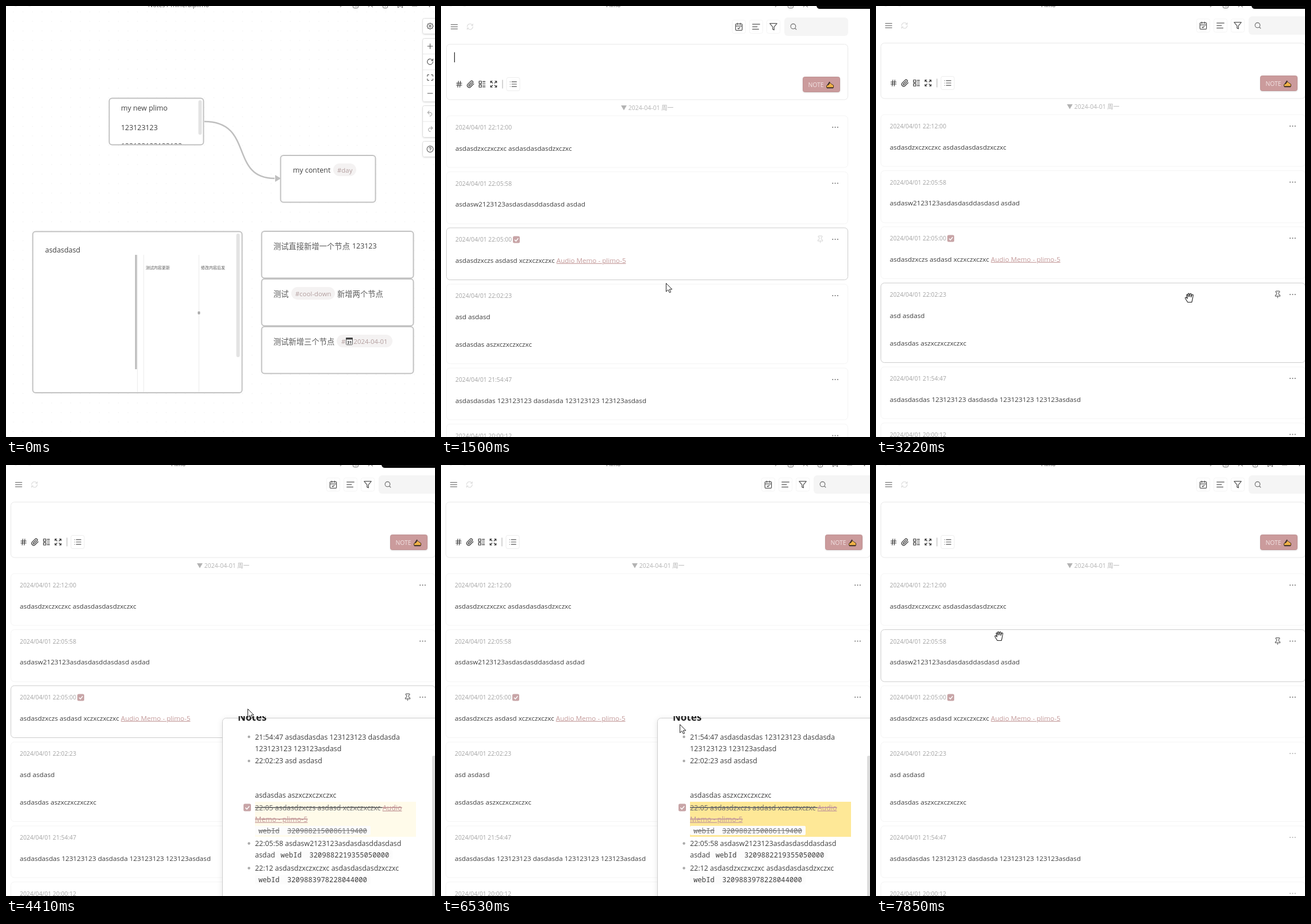
An HTML page for the animation above (7.99 s loop, 746x750 px).

```html
<!DOCTYPE html>
<html lang="zh">
<head>
<meta charset="utf-8">
<title>Notes</title>
<style>
html, body { margin: 0; width: 100%; height: 100%; overflow: hidden; background: #fff; }
svg { display: block; width: 746px; height: 750px; }
text { font-family: "Open Sans", "Noto Sans CJK SC", "Noto Sans CJK", sans-serif; white-space: pre; }
.mono { font-family: "Noto Sans Mono", "DejaVu Sans Mono", monospace; font-size: 12.2px; }
.cjk { font-weight: 300; }
.link { fill: #c49a9a; text-decoration: underline; }
.done { text-decoration: line-through; }
.done .link, .link.done { text-decoration: underline line-through; }
.icon { fill: none; stroke-linecap: round; stroke-linejoin: round; }
.node { fill: #fff; stroke: #c2c2c2; stroke-width: 2; }
</style>
</head>
<body>
<svg id="stage" viewBox="0 0 746 750" xmlns="http://www.w3.org/2000/svg"></svg>
<script>
const LOOP = 7990;
const INK = '#3f3f3f', ROSE = '#c8a5a7';

const text = (x, y, s, size = 12.4, fill = INK, more = '') =>
  `<text x="${x}" y="${y}" font-size="${size}" fill="${fill}" ${more}>${s}</text>`;
const rect = (x, y, w, h, r, fill, more = '') =>
  `<rect x="${x}" y="${y}" width="${w}" height="${h}" rx="${r}" fill="${fill}" ${more}/>`;
const path = (d, stroke, w = 1, more = '') =>
  `<path d="${d}" fill="none" stroke="${stroke}" stroke-width="${w}" ${more}/>`;
const icon = (name, x, y, size = 15, color = '#555', w = 2) =>
  `<path class="icon" d="${ICONS[name]}" stroke="${color}" stroke-width="${w}" ` +
  `transform="translate(${x - size / 2} ${y - size / 2}) scale(${size / 24})"/>`;
const group = (id, body, more = '') => `<g id="${id}" ${more}>${body}</g>`;
const check = (x, y, s) => rect(x, y, s, s, 2.5, ROSE) +
  path(`M${x + s * .25} ${y + s * .52}l${s * .2} ${s * .2} ${s * .33}-${s * .4}`, '#fff', 1.5);

const ICONS = {
  menu: 'M3 6h18M3 12h18M3 18h18',
  refresh: 'M3 12a9 9 0 0 1 15-6.7L21 8M21 3v5h-5M21 12a9 9 0 0 1-15 6.7L3 16M3 21v-5h5',
  reload: 'M21 12a9 9 0 1 1-2.600-6.400L21 8M21 3v5h-5',
  date: 'M3 6a2 2 0 0 1 2-2h14a2 2 0 0 1 2 2v14a2 2 0 0 1-2 2H5a2 2 0 0 1-2-2ZM3 10h18M8 2v4M16 2v4M9 16l2 2 4-4',
  align: 'M2 5h20M2 12h13M2 19h17',
  filter: 'M22 3H2l8 9.500V19l4 2v-8.500Z',
  search: 'M19 11a8 8 0 1 1-16 0 8 8 0 0 1 16 0M21 21l-4.300-4.300',
  hash: 'M4 9h16M4 15h16M10 3 8 21M16 3l-2 18',
  clip: 'M21.400 11l-9.200 9.200a6 6 0 0 1-8.500-8.500l8.600-8.600a4 4 0 1 1 5.700 5.700l-8.600 8.600a2 2 0 0 1-2.800-2.800l8.500-8.500',
  blocks: 'M3 3h7v7H3ZM3 14h7v7H3ZM14 4h7M14 9h7M14 15h7M14 20h7',
  expand: 'M15 15l6 6M15 9l6-6M21 16v5h-5M21 8V3h-5M3 16v5h5M3 21l6-6M3 8V3h5M9 9 3 3',
  list: 'M8 5h14M8 12h14M8 19h14M3 5h.01M3 12h.01M3 19h.01',
  pin: 'M12 17v5M5 17h14v-1.800a2 2 0 0 0-1.100-1.800l-1.800-.9A2 2 0 0 1 15 10.800V6h1a2 2 0 0 0 0-4H8a2 2 0 0 0 0 4h1v4.800a2 2 0 0 1-1.100 1.700l-1.800.9A2 2 0 0 0 5 15.200Z',
  more: 'M4 12h.01M12 12h.01M20 12h.01',
  gear: 'M12 2l3 3 4-.5 .5 4 2.500 3.500-2.500 3.500-.5 4-4-.5-3 3-3-3-4 .5-.5-4L2 12l2.500-3.500 .5-4 4 .5ZM15 12a3 3 0 1 1-6 0 3 3 0 0 1 6 0',
  plus: 'M4 12h16M12 4v16',
  minus: 'M4 12h16',
  fit: 'M8 3H5a2 2 0 0 0-2 2v3M21 8V5a2 2 0 0 0-2-2h-3M3 16v3a2 2 0 0 0 2 2h3M16 21h3a2 2 0 0 0 2-2v-3',
  undo: 'M9 14 4 9l5-5M4 9h10a6 6 0 0 1 0 11h-3',
  redo: 'M15 14l5-5-5-5M20 9H10a6 6 0 0 0 0 11h3',
  help: 'M22 12a10 10 0 1 1-20 0 10 10 0 0 1 20 0M9 9a3 3 0 0 1 6 1c0 2-3 2-3 4M12 17.500h.01',
  prev: 'M15 18l-6-6 6-6',
  next: 'M9 18l6-6-6-6',
  target: 'M22 12a10 10 0 1 1-20 0 10 10 0 0 1 20 0M22 12h-4M6 12H2M12 6V2M12 22v-4',
  tiles: 'M3 3h7v7H3ZM14 3h7v7h-7ZM14 14h7v7h-7ZM3 14h7v7H3Z',
  star: 'M12 2l3 6.500 7 .8-5.200 4.800 1.500 7L12 17.500 5.700 21l1.500-7L2 9.300l7-.8Z',
  archive: 'M2 3h20v5H2ZM4 8v13h16V8M10 12h4',
  recycle: 'M7 19H4.500a2 2 0 0 1-1.500-3l4-6.500M11 19h8.500a2 2 0 0 0 1.500-3l-1.500-2.500M14 16l-3 3 3 3M8.300 13.600 7.200 9.500 3 10.600M9.300 5.800l1.200-1.900a2 2 0 0 1 3.200 0l4 6.500M13.400 9.600l4.100 1 1.100-4'
};

function topBar() {
  const c = '#666';
  return group('pathTitle', text(247, 1.5, 'Notes / mineralplimo', 10.8, '#555')) +
    group('viewTitle', text(287, 1.5, 'Plimo', 9.6, '#444')) +
    path('M15 0h4M39 0h4', '#ddd') + path('M584-1l-3 3', c) +
    path('M603.500-2v3.500q0 2 2 2h5q2 0 2-2V-2M606 0h5', c) +
    path('M630 2l4-4M635 0l3 2', c) +
    path('M655.500-2v3.500q0 2 2 2h4q2 0 2-2V-2M658 0h3', c) +
    path('M681.500-2v5l4-3 4 3v-5', c) + path('M706 0h9', c) +
    '<circle cx="736.500" cy="1" r="1" fill="#666"/>' +
    group('black', '<path d="M653 0q1 5 6 5h87V0Z" fill="#050505"/>');
}

const node = (x, y, w, h) => rect(x, y, w, h, 5, '#fff', 'class="node"');
const pill = (x, y, w) => rect(x, y, w, 22, 11, '#f4f2f2');
const cjk = (x, y, s, size, fill = '#5a5a5a') => text(x, y, s, size, fill, 'class="cjk"');

function board() {
  const tag = '#b39f9f';
  const panels = [[21, 27], [56, 110], [173, 55], [235, 27]]
    .map(([y, h]) => rect(724.5, y + .5, 30, h, 3, '#fff', 'stroke="#dedede" filter="url(#soft)"')).join('');
  const tools = Object.entries({ gear: 35, plus: 70, reload: 97, fit: 124.5, minus: 152, undo: 187, redo: 214, help: 249 })
    .map(([n, y]) => icon(n, 737.5, y, 13, /do$/.test(n) ? '#aaa' : '#555')).join('');
  return rect(0, 5, 746, 745, 0, 'url(#dots)') +
    path('M345 201C432 201 388 300 467 300', '#bfbfbf', 2.5) +
    '<path d="M468 294l10 6-10 6Z" fill="#bfbfbf"/>' +
    node(179.5, 160.5, 164, 81) + rect(334.5, 164, 6, 60, 3, '#e3e3e3') +
    text(200, 182, 'my new plimo') + text(200, 215.5, '123123123') +
    `<g clip-path="url(#cut)">${text(200, 248, '123123123123123')}</g>` +
    node(477.5, 260, 165, 81.5) + text(499, 289.5, 'my content') + pill(569, 274, 40) + text(576, 289.5, '#day', 11.4, tag) +
    node(46.5, 392.5, 364, 280.5) + text(68, 428.5, 'asdasdasd') +
    rect(400.5, 396, 6, 215, 3, '#e3e3e3') +
    path('M226 433V632', '#b8b8b8', 3) + path('M228.500 433V672M239.500 433V672M335.500 433V672', '#ececec') +
    cjk(243, 457.5, '测试内容更新', 7) + cjk(339, 457.5, '修改内容后发', 7) +
    rect(333.5, 531.5, 4, 5, 1, '#aaa') +
    [392, 475, 558].map(y => node(444.5, y, 264, 81.5)).join('') +
    cjk(465, 422.5, '测试直接新增一个节点', 13.3) + text(602, 422, '123123') +
    cjk(465, 505.5, '测试', 13.3) + pill(496, 489, 76) + text(503, 504.5, '#cool-down', 11.4, tag) + cjk(576, 505.5, '新增两个节点', 13.3) +
    cjk(465, 588.5, '测试新增三个节点', 13.3) + pill(575, 572, 97) + text(583, 587.5, '#', 11.4, tag) +
    rect(591.5, 577.5, 11, 12, 1, '#fff', 'stroke="#555"') + rect(591, 577, 12, 3.5, 1, '#444') +
    text(593.2, 588, '31', 7, '#333', 'font-weight="700"') + text(604.5, 587.5, '2024-04-01', 11.3, tag) +
    panels + path('M725 83.500h21M725 111h21M725 138.500h21M725 201h21', '#e8e8e8') + tools;
}

const ROWS = [
  [189, 90, '22:12:00', 'asdasdzxczxczxc asdasdasdasdzxczxc'],
  [286.5, 90.5, '22:05:58', 'asdasw2123123asdasdasddasdasd asdad'],
  [384, 90.5, '22:05:00', 'asdasdzxczs asdasd xczxczxczxc <tspan class="link">Audio Memo - plimo-5</tspan>'],
  [482, 138.5, '22:02:23', 'asd asdasd', 'asdasdas aszxczxczxczxc'],
  [628, 90, '21:54:47', 'asdasdasdas 123123123 dasdasda 123123123 123123asdasd'],
  [725.5, 90, '20:00:12', 'asdasd']
];

function leftPart() {
  const rows = ROWS.map(([y, h, time, ...lines]) =>
    rect(8.5, y, 738, h, 6, '#fff', 'class="row wide"') +
    text(24, y + 24, '2024/04/01 ' + time, 10.3, '#a3a3a3') +
    lines.map((s, i) => text(24, y + 60.5 + i * 48.5, s, 11.67)).join('')).join('');
  const icons = [['hash', 30.5], ['clip', 50.5], ['blocks', 70.5], ['expand', 90.5]]
    .map(([n, x]) => icon(n, x, 134, 14, '#333')).join('');
  return rect(8.5, 64.5, 738, 96.5, 6, '#fff', 'class="wide" stroke="#e8e8e8"') +
    icons + path('M106 126.500V141.500', '#aaa') +
    rect(113, 122.5, 23, 23, 3, '#fff', 'stroke="#eee"') + icon('list', 124.5, 134, 14) +
    group('caret', path('M22.500 78.500v17.500', '#222', 1.2)) +
    group('menu', icon('menu', 22, 34, 15, '#777')) +
    group('sync', icon('refresh', 49.5, 34, 13, '#dcdcdc')) +
    group('rows', rows + check(124, 398.5, 12));
}

function rightPart() {
  const rowIcons = ROWS.map(([y]) =>
    `<g class="more">${icon('more', 724.5, y + 20, 13, '#777', 4)}</g>` +
    `<g class="pin" opacity="0">${icon('pin', 698.5, y + 20, 14, '#666')}</g>`).join('');
  return rect(668.5, 121.5, 64, 26, 3, '#cb9b9c', 'stroke="#bd9192" filter="url(#soft)"') +
    text(677.5, 138.5, 'NOTE', 10.4, '#f3e4e4') +
    '<path d="M709.500 140h12v-4l-4-2.500-2-2-2 3-4 2Z" fill="#f0b247" stroke="#3a2a18" stroke-width=".9"/>' +
    path('M711 136l4-6M710 140.500h11', '#2d2220', 1.4) +
    group('moreAll', rowIcons);
}

function searchPart() {
  return [['date', 569], ['align', 599], ['filter', 629]].map(([n, x]) =>
    rect(x - 11.5, 22.5, 23, 23, 3, '#fff', 'stroke="#f4f4f4"') + icon(n, x, 34, 15)).join('') +
    '<rect id="searchBox" x="648" y="18" width="98" height="32" rx="6" fill="#f5f5f5"/>' +
    icon('search', 664, 34, 13, '#666');
}

function sidebar() {
  const colX = i => 31.5 + 22.85 * i;
  const mid = 'text-anchor="middle"';
  let days = '';
  for (let d = 1; d <= 30; d++) {
    days += text(colX(d % 7), 137.5 + 29 * Math.floor(d / 7), d, 11.6, d > 1 ? '#a0a0a0' : '#333', mid + (d > 1 ? '' : ' font-weight="700"'));
  }
  const week = [...'日一二三四五六'].map((c, i) => text(colX(i), 114.5, '周' + c, 9, '#888', mid)).join('');
  const menu = [['star', 308, '随机回顾'], ['archive', 342, '归档'], ['recycle', 377, '回收站']]
    .map(([n, y, s]) => icon(n, 27, y, 14) + cjk(41, y + 4.5, s, 10.9, '#777')).join('');
  return text(20, 63, 'PLIMO PLI...', 15.2, '#333', 'font-weight="700"') +
    rect(114, 47, 27, 19.5, 2, '#4a86e8') + text(127.5, 60.5, 'PRO', 10.4, '#fff', mid) +
    icon('more', 165, 57, 13, '#333', 4) +
    icon('prev', 54, 92, 14) + text(99, 96, '2024 年 4 月', 11, '#777', mid) + icon('next', 145, 92, 14) +
    week + rect(44, 122, 21, 25, 2, '#e8effb') + days +
    rect(16.5, 276, 126.5, 5, 2, '#98e4a6') + icon('target', 156.5, 278.5, 15) + icon('tiles', 181.5, 278.5, 15) +
    menu + cjk(20, 417, '检索式', 10, '#b5b5b5') + cjk(20, 455, '常用标签', 10, '#777') +
    cjk(20, 486, '输入', 10, '#777') + rect(44, 472, 35, 19, 2, '#e8f0fd') +
    text(47.5, 486, '#标签', 9.8, '#3b76d9') + cjk(81, 486, '来创建标签...', 9.8, '#777');
}

function popup() {
  const bullet = y => `<circle cx="422.500" cy="${y}" r="2.200" fill="#aaa"/>`;
  const code = (x, y, id, more = '') => rect(x - 6, y - 12.5, 201, 16, 2, '#fcfcfc') +
    `<text class="mono ${more}" x="${x}" y="${y}" fill="${more ? '#777' : INK}">webId</text>` +
    `<text class="mono ${more}" x="${x + 50}" y="${y}" fill="${more ? '#777' : INK}">${id}</text>`;
  return rect(376.5, 440.5, 390, 330, 6, '#fff', 'stroke="#cfcfcf" filter="url(#shade)"') +
    `<g clip-path="url(#headCut)">${text(403, 444.5, 'Notes', 17, '#222', 'font-weight="700"')}</g>` +
    rect(741, 506, 8, 260, 2, '#dcdcdc') + [473, 515, 658.5, 701.5].map(bullet).join('') +
    text(433, 477.5, '21:54:47 asdasdasdas 123123123 dasdasda') + text(433, 497.5, '123123123 123123asdasd') +
    text(433, 519, '22:02:23 asd asdasd') + text(433, 578.5, 'asdasdas aszxczxczxczxc') +
    check(413, 589.5, 13) + group('flash', rect(433, 586, 280, 61, 0, '#fee897')) +
    `<g class="done">${text(433, 600.5, '22:05 asdasdzxczs asdasd xczxczxczxc <tspan class="link">Audio</tspan>', 12.4, '#666', 'class="done"')}` +
    text(433, 620.5, 'Memo - plimo-5', 12.4, '#c49a9a', 'class="link done"') + '</g>' +
    code(439, 640.5, '3209882150086119400', 'done') +
    text(433, 663, '22:05:58 asdasw2123123asdasdasddasdasd') + text(433, 683, 'asdad') +
    code(477.5, 683, '3209882219355050000') +
    text(433, 706, '22:12 asdasdzxczxczxc asdasdasdasdzxczxc') + code(439, 726, '3209883978228044000');
}

const ARROW = '<path d="M.5.5v14.500l3.400-3.200 2.500 5 2.200-1-2.400-4.800h4.600Z" fill="#fff" stroke="#222" stroke-linejoin="round"/>';
const HAND = '<path d="M-3 8.500-6.800 2.500Q-8-.5-5.500 0l2 2-1.500-6q.5-2 2 0l1 3-.5-5q1-2 2.200 0l.5 5 .8-5q1.300-1.500 2.200 0l-.3 5.500 1.500-4q1.500-1.200 2.200.5L5 5l-1 3.500Z" fill="#fff" stroke="#222" stroke-width="1.100" stroke-linejoin="round"/>';

const stage = document.getElementById('stage');
stage.innerHTML = `<defs>
  <pattern id="dots" width="16.600" height="16.600" x="4.600" y="1.900" patternUnits="userSpaceOnUse"><circle cx="8.300" cy="8.300" r=".8" fill="#efefef"/></pattern>
  <filter id="soft" x="-20%" y="-20%" width="140%" height="150%"><feDropShadow dx="0" dy="1" stdDeviation="1" flood-opacity=".12"/></filter>
  <filter id="shade"><feDropShadow dx="0" dy="2" stdDeviation="5" flood-opacity=".1"/></filter>
  <clipPath id="cut"><rect x="182" y="220" width="150" height="20.500"/></clipPath>
  <clipPath id="headCut"><rect x="380" y="437" width="120" height="20"/></clipPath>
  </defs>` +
  group('board', board()) +
  group('view', group('left', leftPart()) + group('right', rightPart()) + group('search', searchPart()) +
    group('mid', text(377.5, 179, '▼ 2024-04-01 周一', 10.5, '#b3b3b3', 'text-anchor="middle"')) +
    group('side', sidebar())) +
  topBar() + group('popup', popup()) + group('arrow', ARROW) + group('hand', HAND);

const el = {};
stage.querySelectorAll('[id]').forEach(n => el[n.id] = n);
const wide = stage.querySelectorAll('.wide'), rowBoxes = stage.querySelectorAll('.row');
const pins = stage.querySelectorAll('.pin'), mores = stage.querySelectorAll('.more');

// pointer: time, x, y
const PATH = [
  [70, 660, 752], [140, 640, 715], [400, 330, 560], [670, -14, 455], [950, -14, 462], [1080, 150, 470],
  [1220, 320, 476], [1500, 391, 482], [1710, 456, 488], [1990, 495, 494], [2260, 495, 494],
  [3010, 542, 497], [3220, 545, 507], [3500, 500, 498], [3860, 430, 452], [4410, 420, 424],
  [4960, 420, 424], [5200, 480, 530], [5440, 525, 605], [5590, 525, 608], [6120, 525, 608],
  [6530, 415, 451], [6880, 392, 402], [7710, 214, 297]
];
// hovered row: index, from, to
const HOVERS = [[2, 1430, 1600], [3, 1600, 3820], [2, 3820, 5040], [2, 6640, 7290], [1, 7560, LOOP]];
const HANDS = [[1760, 3480], [7600, LOOP]];

const clamp = (v, a = 0, b = 1) => Math.min(b, Math.max(a, v));
const ramp = (t, a, b) => clamp((t - a) / (b - a));
const within = (t, a, b) => t >= a && t < b;
const show = (n, on) => n.setAttribute('display', on ? 'inline' : 'none');
// whole pixels keep hairlines crisp
const move = (n, x, y) => n.setAttribute('transform', `translate(${Math.round(x)} ${Math.round(y)})`);

function pointAt(t) {
  let i = PATH.findIndex(k => k[0] > t);
  if (i < 0) return PATH[PATH.length - 1].slice(1);
  if (i === 0) return PATH[0].slice(1);
  const [a, x, y] = PATH[i - 1], [b, u, v] = PATH[i], p = ramp(t, a, b);
  return [x + (u - x) * p, y + (v - y) * p];
}

function draw(t) {
  const onBoard = t < 950, open = t >= 1090;
  show(el.board, onBoard);
  show(el.view, open);
  show(el.pathTitle, onBoard);
  show(el.viewTitle, !onBoard);
  show(el.black, within(t, 1400, 5100));

  // the panel widens as the sidebar folds away
  const v = clamp((1677 - t) / 457) ** 2;
  const shrink = Math.round(261 * v), edge = 746.5 - shrink;
  const dx = Math.round(8.5 * v), dy = 12 * v;
  const searchX = Math.round(648 - 354 * v + 59 * v * v), listed = t >= 1290;
  move(el.left, dx, dy);
  move(el.right, -shrink, dy);
  move(el.search, searchX - 648, dy);
  move(el.mid, (dx - shrink) / 2, dy);
  wide.forEach(n => n.setAttribute('width', edge - 8.5 - dx));
  el.searchBox.setAttribute('width', v ? edge + .5 - searchX : 110);
  [el.rows, el.mid, el.menu, el.moreAll].forEach(n => show(n, listed));
  move(el.sync, listed ? 0 : -28, 0);
  show(el.caret, t < 1700);
  el.side.setAttribute('opacity', 1 - ramp(t, 1250, 1400));

  const hover = HOVERS.find(h => within(t, h[1], h[2]));
  rowBoxes.forEach((n, i) => {
    const on = hover && hover[0] === i;
    n.setAttribute('stroke', on ? '#cccccc' : '#f4f4f4');
    pins[i].setAttribute('opacity', on ? ramp(t, hover[1], hover[1] + 300) : 0);
    mores[i].setAttribute('opacity', i > 2 && t > 7000 ? .55 : 1);
  });

  el.popup.setAttribute('opacity', ramp(t, 4130, 4270) * (1 - ramp(t, 6950, 7090)));
  el.flash.setAttribute('opacity', ramp(t, 4340, 4690));

  const [x, y] = pointAt(t), grab = HANDS.some(h => within(t, ...h));
  show(el.arrow, t >= 70 && !grab);
  show(el.hand, grab);
  move(el.arrow, x, y);
  move(el.hand, x, y);
}

function tick() {
  draw(performance.now() % LOOP);
  requestAnimationFrame(tick);
}
tick();
</script>
</body>
</html>
```
